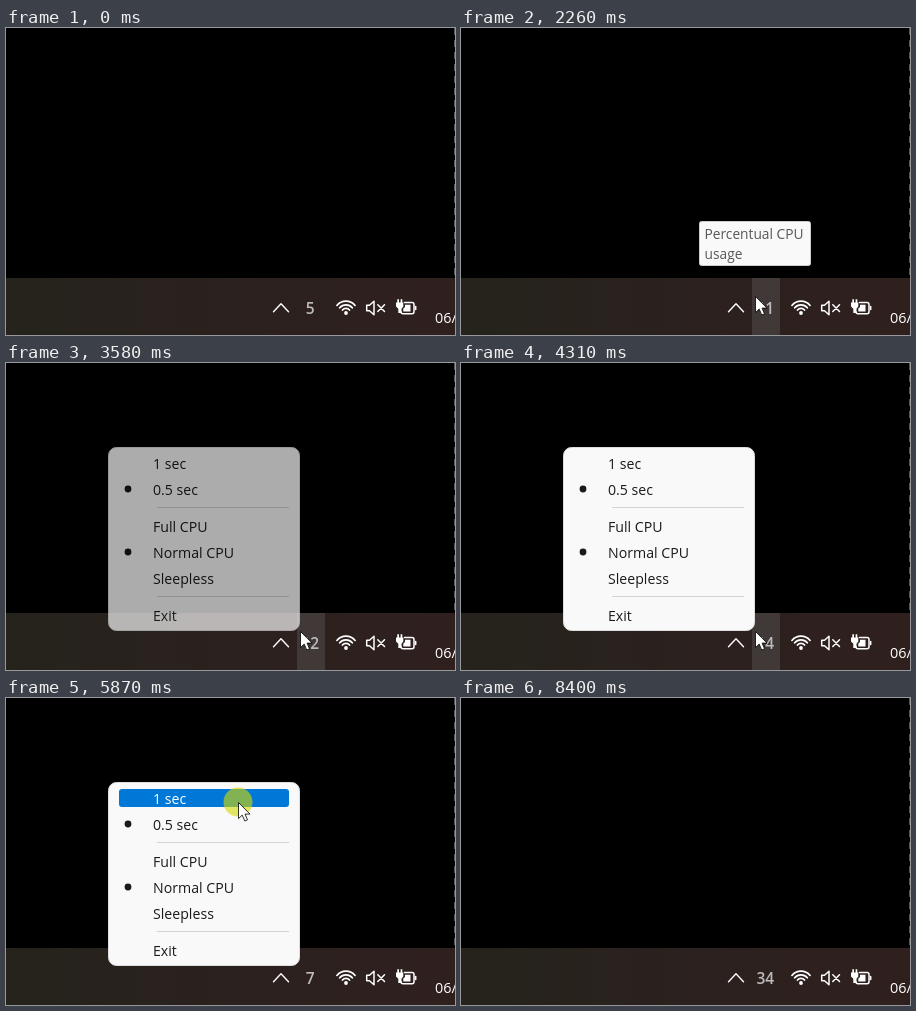
Animation, 449 px wide and 307 px high, one loop 9.21 s. Source, as an HTML page:

```html
<!DOCTYPE html>
<html lang="en">
<head>
<meta charset="utf-8">
<title>CPU tray menu</title>
<style>
  html, body { margin: 0; width: 100%; height: 100%; overflow: hidden; background: #000; }
  svg { display: block; }
  text { font: 14.15px "Open Sans", "Noto Sans", sans-serif; }
  #tip text { font-size: 13.75px; }
  #date { font-size: 14.4px; }
  #load { font-size: 15.5px; font-weight: 600; }
  .icon { fill: none; stroke: #fff; stroke-width: 1.5; stroke-linecap: round; stroke-linejoin: round; }
  .solid { fill: #fff; stroke: none; }
</style>
</head>
<body>
<svg width="449" height="307" viewBox="0 0 449 307">
  <defs>
    <linearGradient id="barFill">
      <stop offset="0" stop-color="#25231c"/>
      <stop offset=".5" stop-color="#2b211e"/>
      <stop offset="1" stop-color="#2f201e"/>
    </linearGradient>
  </defs>
  <rect width="449" height="307"/>
  <path d="M448.5 0V250" stroke="#555" stroke-dasharray="7 5"/>
  <rect y="250" width="449" height="57" fill="url(#barFill)"/>
  <rect id="hover" x="291" y="250" width="28" height="57" fill="#413938"/>

  <g class="icon">
    <path d="M267.5 283.8L275 275.8L282.5 283.8" stroke-width="1.4"/>
    <path id="wifi" stroke-width="1.7"/>
    <circle class="solid" cx="340" cy="285" r="1.9"/>
    <path d="M360.7 277.3H363.5L368 273.3V286.7L363.5 282.7H360.7Z"/>
    <path d="M371.8 276.8L378.5 283.5M378.5 276.8L371.8 283.5"/>
    <path d="M398.5 274.5H406A2 2 0 0 1 408 276.5V283.7A2 2 0 0 1 406 285.7H397A2 2 0 0 1 395 283.7M409.7 278.5V281.5"/>
    <path class="solid" d="M399 276.8H404.5V283.4H397.3V280.5L399 279Z"/>
    <path class="solid" d="M390 274.5H397.3V278.5L395.5 280.8V285H392.3V280.8L390 278.5ZM391.3 271.2H393V275H391.3ZM394.6 271.2H396.3V275H394.6Z"/>
  </g>
  <text id="date" x="429" y="295" fill="#fff">06/</text>
  <text id="load" x="304.3" y="285.6" fill="#bcbcbc" text-anchor="middle"></text>

  <g id="tip" fill="#575757">
    <rect x="238.5" y="193.5" width="111" height="44" rx="2" fill="#f9f9f9" stroke="#ccc"/>
    <text x="243.5" y="211">Percentual CPU</text>
    <text x="243.5" y="231">usage</text>
  </g>

  <g id="menu">
    <g id="panel">
      <rect x="102.5" y="84.5" width="191" height="183" rx="8" fill="#f9f9f9" stroke="#dedede"/>
      <path d="M151 144.5H283M151 233.5H283" stroke="#d4d4d4"/>
    </g>
    <rect id="row" x="105" y="87" width="186" height="26" fill="#f9f9f9"/>
    <rect id="bar" x="113" width="170" height="18" rx="3" fill="#0078d7"/>
    <g id="items"></g>
  </g>

  <circle id="click" r="14.5"/>
  <path id="cursor" d="M.5.5V16.6L4.2 13.1L6.8 19L9.5 17.8L7 12.1H12Z" fill="#fff" stroke="#000" stroke-width=".8"/>
</svg>

<script>
const LOOP = 9210;
const CLOSE = 6000;       // menu choice made
const SLOW = 6390;        // first tick at the slower rate
const loads = "5 13 10 9 12 11 8 12 10 14 9 12 7 10 12 34".split(" ");
const groups = [["1 sec", "0.5 sec"], ["Full CPU", "Normal CPU", "Sleepless"], ["Exit"]];
const marked = ["0.5 sec", "Normal CPU"];

const tray = [294, 268], choice = [232, 104];
const moves = [
  { start: 660, end: 1990, from: [380, -16], bend: [460, 240], to: tray },
  { start: 4770, end: 5400, from: tray, bend: [268, 190], to: choice },
  { start: 7310, end: 7740, from: choice, bend: [305, 90], to: [368, 60] }
];

const $ = id => document.getElementById(id);
const show = (id, alpha) => $(id).setAttribute("opacity", Number(alpha));
const ramp = (t, start, length) => Math.min(1, Math.max(0, (t - start) / length));
const within = (t, a, b) => t >= a && t < b;

$("wifi").setAttribute("d", [4.6, 8.2, 11.8].map(r =>
  `M${340 - .77 * r} ${285 - .64 * r}a${r} ${r} 0 0 1 ${1.54 * r} 0`).join(""));

// rows are 26 apart, with 11 more for each separator
const rows = groups.flatMap((group, g) => group.map(label => ({ label, g })));
rows.forEach((row, i) => row.y = 100 + 26 * i + 11 * row.g);
$("items").innerHTML = rows.map(({ label, y }) =>
  `<g>${marked.includes(label) ? `<circle cx="122" cy="${y}" r="3.4"/>` : ""}<text x="147" y="${y + 6}">${label}</text></g>`
).join("");
const items = [...$("items").children];

function loadAt(t) {
  const n = t < SLOW ? 1 + Math.floor((t - 130) / 521.8) : 13 + Math.floor((t - SLOW) / 1005);
  return loads[n];
}

function cursorAt(t) {
  const { start, end, from, bend, to } = moves.findLast(m => m.start <= t) || moves[0];
  const u = ramp(t, start, end - start) ** 1.6, v = 1 - u;
  return from.map((a, i) => a * v * v + 2 * bend[i] * u * v + to[i] * u * u);
}

function draw() {
  const t = performance.now() % LOOP;
  const [x, y] = cursorAt(t);
  const closing = t >= CLOSE;

  $("load").textContent = loadAt(t);
  $("cursor").setAttribute("transform", `translate(${x} ${y})`);
  show("cursor", within(t, 660, 7740));
  show("hover", within(x, 290, 319) && y > 250);
  show("tip", ramp(t, 2060, 200) - ramp(t, 3180, 140));

  // the chosen row lingers after the panel closes
  show("menu", closing ? 1 - ramp(t, CLOSE, 270) : ramp(t, 3460, 175));
  show("panel", !closing);
  show("row", closing);

  const picked = t > 4770 ? rows.findIndex(r => Math.abs(r.y + 1 - y) <= 13) : -1;
  show("bar", picked >= 0);
  if (picked >= 0) $("bar").setAttribute("y", rows[picked].y - 9);
  items.forEach((item, i) => {
    item.setAttribute("fill", i === picked ? "#fff" : "#1a1a1a");
    item.setAttribute("opacity", closing && i !== picked ? 0 : 1);
  });

  const right = within(t, 3250, 3520), left = within(t, 5800, CLOSE);
  $("click").setAttribute("cx", x);
  $("click").setAttribute("cy", y);
  $("click").setAttribute("fill", right ? "#e0502c" : "#d2d800");
  show("click", right || left ? .62 : 0);

  requestAnimationFrame(draw);
}
draw();
</script>
</body>
</html>
```
